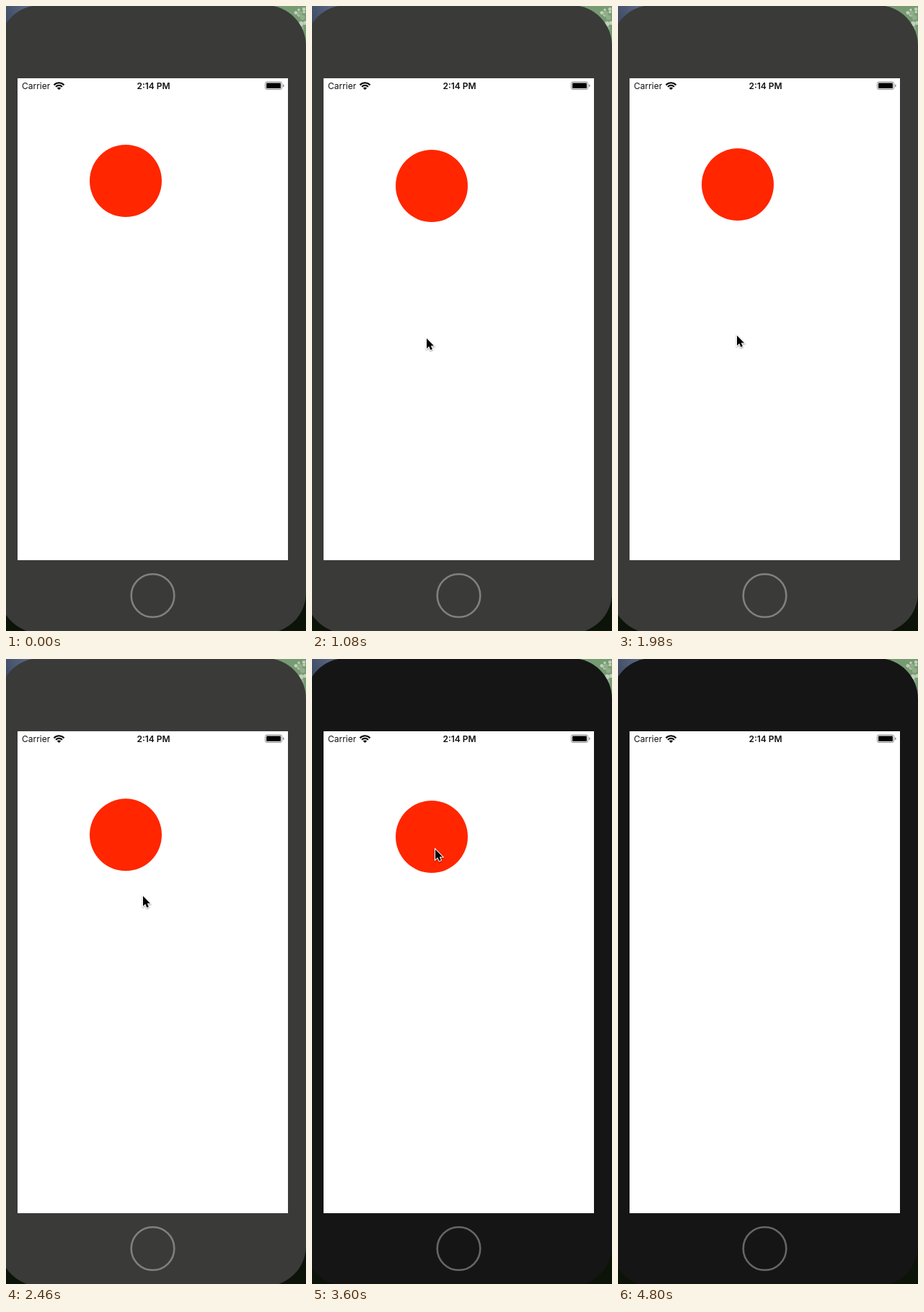
Write an HTML page with a canvas that moves like this. It is 416 by 865 pixels and loops after 4860 ms.

```html
<!DOCTYPE html>
<html lang="en">
<head>
<meta charset="utf-8">
<title>Floating ball</title>
<style>
  html, body { margin: 0; width: 100%; height: 100%; overflow: hidden; }
  canvas { display: block; width: 416px; height: 865px; }
</style>
</head>
<body>
<canvas id="stage" width="416" height="865"></canvas>
<script>
const ctx = document.getElementById('stage').getContext('2d');
const LOOP = 4860, STEP = 60;
const DARK_FROM = 3420;
const FADE = [3900, 4200];
const BOB = { period: 2940, lead: 80, height: 7.8 };

// Pointer tip: time, x, y
const POINTER = [
  [540, 120, 870], [1020, 159, 460], [1620, 159, 460], [1980, 165, 456],
  [2460, 190, 328], [2940, 171, 265], [3180, 171, 264.5], [3600, 171, 263.5],
  [4140, 171, 263.5], [4680, 140, 870]
];

const clamp = v => Math.max(0, Math.min(1, v));
const mix = (a, b, k) => a + (b - a) * k;
const smooth = k => k * k * (3 - 2 * k);

function box(x, y, w, h, r) {
  ctx.beginPath();
  ctx.roundRect(x, y, w, h, r);
}

function disc(x, y, r, color) {
  ctx.fillStyle = color;
  ctx.beginPath();
  ctx.arc(x, y, r, 0, Math.PI * 2);
  ctx.fill();
}

function drawWallpaper() {
  ctx.fillStyle = '#0c1308';
  ctx.fillRect(0, 0, 416, 865);
  const sky = ctx.createLinearGradient(0, 20, 45, 0);
  sky.addColorStop(0, '#404c66');
  sky.addColorStop(1, '#65738e');
  ctx.fillStyle = sky;
  ctx.fillRect(0, 0, 60, 60);
  ctx.fillStyle = '#769b72';
  ctx.fillRect(350, 0, 66, 70);
  let seed = 7;
  const random = () => (seed = seed * 16807 % 2147483647) / 2147483647;
  for (let i = 0; i < 16; i++) {
    const x = 401 + random() * 15, y = random() * 34;
    disc(x, y, 1 + random() * 2.5, i % 3 ? '#c2cfba' : '#91ad8a');
  }
}

function drawPhone(dark) {
  ctx.fillStyle = dark ? '#151515' : '#3a3a38';
  box(-9, -1, 425, 869, 56);
  ctx.fill();
  ctx.fillStyle = '#fff';
  ctx.fillRect(16, 100, 375, 667);
  ctx.strokeStyle = dark ? '#666' : '#80807e';
  ctx.lineWidth = 2.6;
  ctx.beginPath();
  ctx.arc(203.5, 816, 29.8, 0, Math.PI * 2);
  ctx.stroke();
}

function drawWifi() {
  ctx.save();
  ctx.beginPath();
  ctx.moveTo(73.5, 116);
  ctx.arc(73.5, 116, 11, -Math.PI * 0.76, -Math.PI * 0.24);
  ctx.closePath();
  ctx.clip();
  disc(73.5, 116, 3.6, '#000');
  ctx.strokeStyle = '#000';
  ctx.lineWidth = 2.1;
  for (const r of [6.1, 9.7]) {
    ctx.beginPath();
    ctx.arc(73.5, 116, r, 0, Math.PI * 2);
    ctx.stroke();
  }
  ctx.restore();
}

function drawStatusBar() {
  ctx.fillStyle = '#111';
  ctx.textBaseline = 'alphabetic';
  ctx.textAlign = 'left';
  ctx.font = '400 12px Inter, Roboto, sans-serif';
  ctx.fillText('Carrier', 22, 114.5);
  ctx.textAlign = 'center';
  ctx.font = '600 12px Inter, Roboto, sans-serif';
  ctx.fillText('2:14 PM', 204.5, 114.5);
  drawWifi();

  ctx.strokeStyle = '#888';
  ctx.lineWidth = 1;
  box(359.5, 105, 23, 10.5, 2.5);
  ctx.stroke();
  ctx.fillStyle = '#000';
  box(361, 106.5, 20, 7.5, 1);
  ctx.fill();
  ctx.fillStyle = '#888';
  box(384, 108.5, 1.5, 3.5, 0.7);
  ctx.fill();
}

function drawBall(t) {
  const phase = (t + BOB.lead) / BOB.period * Math.PI * 2;
  const y = 242 + BOB.height * (1 - Math.cos(phase)) / 2;
  ctx.globalAlpha = 1 - clamp((t - FADE[0]) / (FADE[1] - FADE[0]));
  disc(166, y, 50, '#ff2600');
  ctx.globalAlpha = 1;
}

function pointerAt(t) {
  const i = POINTER.findIndex(p => p[0] > t);
  if (i < 1) return null;
  const [t0, x0, y0] = POINTER[i - 1], [t1, x1, y1] = POINTER[i];
  const k = smooth((t - t0) / (t1 - t0));
  return [mix(x0, x1, k), mix(y0, y1, k)];
}

function drawPointer(t) {
  const tip = pointerAt(t);
  if (!tip) return;
  ctx.save();
  ctx.translate(...tip);
  ctx.shadowColor = 'rgba(0,0,0,.4)';
  ctx.shadowBlur = 2;
  ctx.shadowOffsetY = 1;
  const arrow = new Path2D('M0 0V14L3.2 11.1L5.4 16L7.9 14.9L5.8 10.2H10Z');
  ctx.strokeStyle = '#fff';
  ctx.lineWidth = 2;
  ctx.stroke(arrow);
  ctx.shadowColor = 'transparent';
  ctx.fillStyle = '#000';
  ctx.fill(arrow);
  ctx.restore();
}

function render(t) {
  drawWallpaper();
  drawPhone(t >= DARK_FROM);
  drawStatusBar();
  drawBall(t);
  drawPointer(t);
}

const start = performance.now();
function tick() {
  const t = (performance.now() - start) % LOOP;
  render(Math.floor(t / STEP) * STEP);
  requestAnimationFrame(tick);
}
tick();
</script>
</body>
</html>
```
